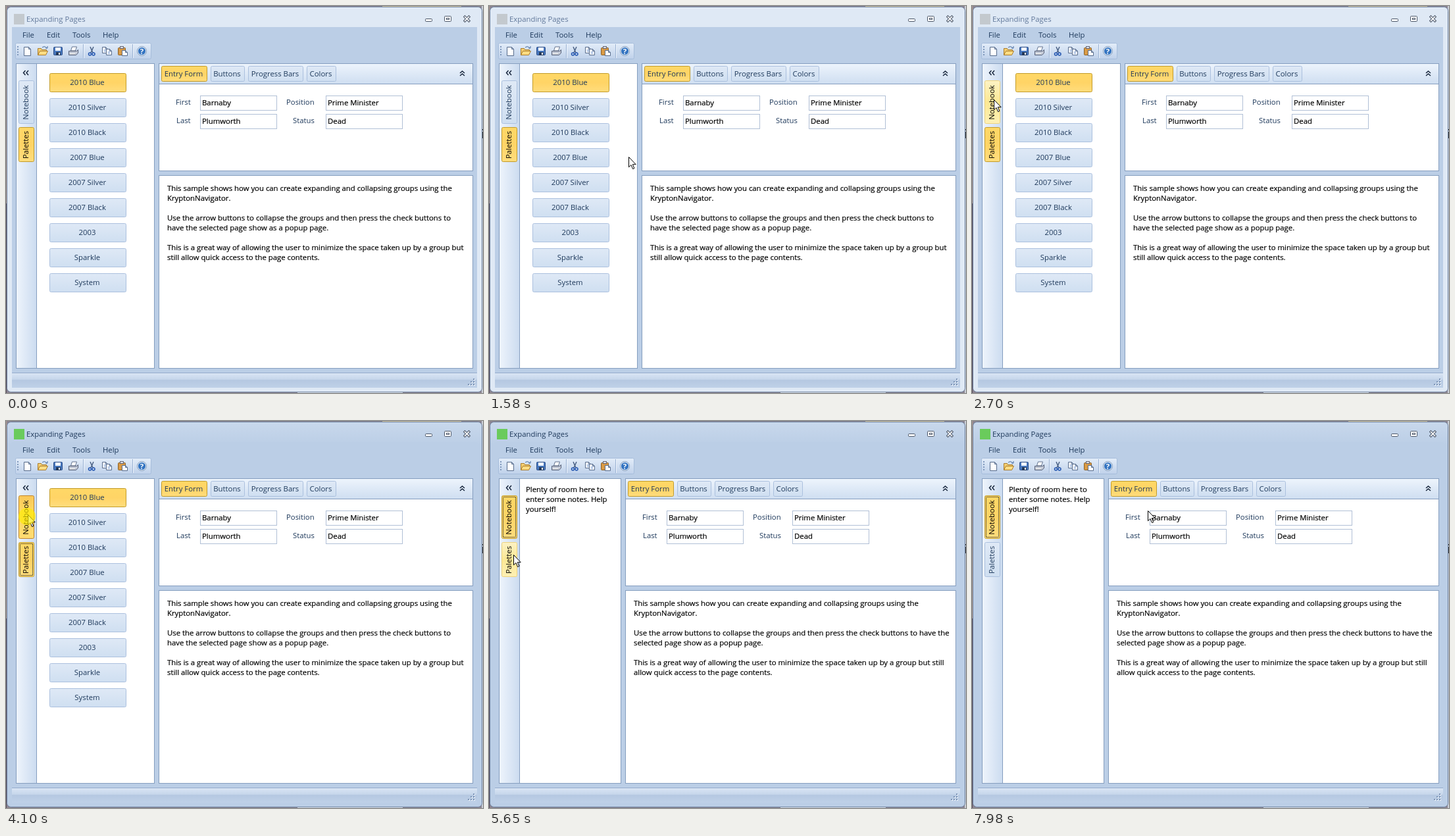
Recreate the animation shown at these times as an HTML page. Size 725 px wide and 588 px high, loop 8 s.

```html
<!DOCTYPE html>
<html lang="en">
<head>
<meta charset="utf-8">
<title>Expanding Pages</title>
<style>
  html, body { margin: 0; width: 100%; height: 100%; overflow: hidden; background: #8b8490; }
  svg { display: block; width: 725px; height: 588px; }
  text { font: 11.35px "Open Sans", "Noto Sans", sans-serif; fill: #1e395b; white-space: pre; }
  .ink { fill: #000; stroke: #000; stroke-width: .2px; }
  .mid { text-anchor: middle; }
  .panel { fill: #fff; stroke: #859ebf; }
  .field { fill: #fff; stroke: #b1c0d6; }
  .key rect { fill: url(#normal); stroke: #abc0de; }
  .key.sel rect { fill: url(#selected); stroke: #c29b29; }
  .key.hot rect { fill: url(#hover); stroke: #eed37c; }
  .key.down rect { fill: url(#pressed); stroke: #c2862b; }
  .key .focus { fill: none !important; stroke: #000 !important; stroke-dasharray: 1 1; stroke-dashoffset: .5; visibility: hidden; }
  .key.focused .focus { visibility: visible; }
  .tab.sel text, .tab.hot text, .tab.down text { fill: #000; }
  .frame { fill: #dfe9f5; }
  .logo { fill: #c3c9ce; }
  .title { fill: #61789a; }
  .active .frame { fill: url(#chrome); }
  .active .logo { fill: #6acb5c; }
  .active .title { fill: #1e395b; }
</style>
</head>
<body>
<svg id="stage" viewBox="0 0 725 588">
  <defs>
    <linearGradient id="normal" x2="0" y2="1"><stop stop-color="#dfe9f6"/><stop offset="1" stop-color="#cfdff1"/></linearGradient>
    <linearGradient id="selected" x2="0" y2="1"><stop stop-color="#ffd866"/><stop offset=".5" stop-color="#ffd466"/><stop offset="1" stop-color="#ffdd7d"/></linearGradient>
    <linearGradient id="hover" x2="0" y2="1"><stop stop-color="#fcf2c4"/><stop offset=".5" stop-color="#fce894"/><stop offset="1" stop-color="#fdf0b5"/></linearGradient>
    <linearGradient id="pressed" x2="0" y2="1"><stop stop-color="#f9c75a"/><stop offset=".3" stop-color="#ffd65f"/><stop offset="1" stop-color="#ffdc72"/></linearGradient>
    <linearGradient id="chrome" x2="0" y2="1"><stop stop-color="#c8d8ec"/><stop offset=".06" stop-color="#bbcee6"/><stop offset="1" stop-color="#bbcee6"/></linearGradient>
    <linearGradient id="strip"><stop stop-color="#eef4fc"/><stop offset="1" stop-color="#ccdcf0"/></linearGradient>
    <linearGradient id="header" x2="0" y2="1"><stop stop-color="#edf4fc"/><stop offset="1" stop-color="#cfdef1"/></linearGradient>
    <linearGradient id="bar" x2="0" y2="1"><stop stop-color="#e3edf9"/><stop offset="1" stop-color="#bfd1ea"/></linearGradient>
    <linearGradient id="status" x2="0" y2="1"><stop stop-color="#d9e5f4"/><stop offset=".42" stop-color="#c6d6eb"/><stop offset=".48" stop-color="#b5c8e1"/><stop offset="1" stop-color="#bfd1e8"/></linearGradient>
  </defs>
</svg>
<script>
const NS = 'http://www.w3.org/2000/svg';
const stage = document.getElementById('stage');

function add(parent, tag, attrs = {}, content) {
  const node = document.createElementNS(NS, tag);
  for (const name in attrs) node.setAttribute(name, attrs[name]);
  if (content) node.textContent = content;
  return parent.appendChild(node);
}
const group = (parent, attrs) => add(parent, 'g', attrs);
const rect = (parent, x, y, width, height, attrs) => add(parent, 'rect', { x, y, width, height, ...attrs });
const path = (parent, d, attrs) => add(parent, 'path', { d, fill: 'none', stroke: '#1e395b', ...attrs });
const label = (parent, x, y, content, attrs) => add(parent, 'text', { x, y, ...attrs }, content);

function key(parent, x, y, w, h, content, cls = '') {
  const node = group(parent, { class: 'key ' + cls });
  rect(node, x + .5, y + .5, w - 1, h - 1, { rx: 2 });
  label(node, x + w / 2 - 1, y + h / 2 + 3.5, content, { class: 'mid' });
  return { node, x, y, w, h };
}

function sideTab(parent, y, h, content) {
  const node = group(parent, { class: 'key tab' });
  rect(node, 19.5, y + .5, 23, h - 1, { rx: 2 });
  rect(node, 21.5, y + 2.5, 19, h - 5, { class: 'focus' });
  add(node, 'text', { transform: `translate(34 ${y + h / 2 + .5}) rotate(-90)`, class: 'mid' }, content);
  return { node, x: 19, y, w: 24, h };
}

function drawWindow() {
  rect(stage, 0, 0, 1, 300, { fill: '#a9958c' });
  rect(stage, 0, 300, 1, 288, { fill: '#574c5c' });
  rect(stage, 572, 0, 120, 1, { fill: '#d9c9a0' });
  rect(stage, 723, 0, 2, 588, { fill: '#c9ced6' });
  rect(stage, 443, 587, 160, 1, { fill: '#e4e8ee' });
  rect(stage, 1.5, 1.5, 722, 585, { rx: 6, class: 'frame', stroke: '#6d819e' });
  path(stage, 'M724.5 187v2m0 2v10', { stroke: '#333' });
  rect(stage, 9, 32, 707, 548, { fill: '#bbcee6' });
  rect(stage, 12, 12, 16, 16, { class: 'logo' });
  label(stage, 31, 24, 'Expanding Pages', { class: 'title' });

  const glyph = { stroke: '#4b5668', fill: '#fff' };
  rect(stage, 637.5, 19.5, 10, 4, { rx: 1, ...glyph });
  rect(stage, 666.5, 15.5, 10, 8, { rx: 1, ...glyph });
  rect(stage, 669.5, 18.5, 4, 2, glyph);
  const cross = 'M697.5 16.5l6 6m0-6l-6 6';
  path(stage, cross, { stroke: '#4b5668', 'stroke-width': 3.8, 'stroke-linecap': 'square' });
  path(stage, cross, { stroke: '#fff', 'stroke-width': 1.7, 'stroke-linecap': 'square' });

  [['File', 25], ['Edit', 62], ['Tools', 101], ['Help', 147]].forEach(([name, x]) => label(stage, x, 48, name));
  drawToolbar();

  rect(stage, 9, 557, 707, 1, { fill: '#94abcb' });
  rect(stage, 9, 558, 707, 22, { fill: 'url(#status)' });
  for (let row = 0; row < 3; row++)
    for (let col = 2 - row; col < 3; col++) {
      rect(stage, 703 + col * 4, 567 + row * 4, 2, 2, { fill: '#edf3fa' });
      rect(stage, 702 + col * 4, 566 + row * 4, 2, 2, { fill: '#7b93b5' });
    }
}

function drawToolbar() {
  rect(stage, 14.5, 56.5, 206, 24, { rx: 2, fill: 'url(#bar)', stroke: '#a6bddb' });
  for (let i = 0; i < 4; i++) rect(stage, 17, 61 + i * 4, 2, 2, { fill: '#7f98bc' });
  for (const x of [117.5, 192.5]) {
    path(stage, `M${x} 58v21`, { stroke: '#98b0d2' });
    path(stage, `M${x + 1} 58v21`, { stroke: '#f0f6fd' });
  }
  const sheet = (x, y, w, h) =>
    path(stage, `M${x} ${y}h${w - 3}l3 3v${h - 3}h${-w}zm${w - 3} 0v3h3`, { fill: '#fff', stroke: '#566b8c' });
  sheet(27.5, 62.5, 10, 13);

  path(stage, 'M48.5 74.5v-10h5l1 2h7v3', { fill: '#f5cf72', stroke: '#a97c2c' });
  path(stage, 'M48.5 74.5l3-6h12l-3 6z', { fill: '#ffdc82', stroke: '#a97c2c' });
  path(stage, 'M55 63q4-3 7 1m1-3v3h-3', { stroke: '#42699e' });

  rect(stage, 72.5, 62.5, 13, 12, { rx: 1, fill: '#4878bf', stroke: '#2b4c86' });
  rect(stage, 75, 63, 8, 5, { fill: '#f5f9ff' });
  rect(stage, 76, 70, 7, 5, { fill: '#243959' });
  rect(stage, 80, 71, 2, 3, { fill: '#fff' });

  path(stage, 'M98.5 68l2-6h7l-2 6z', { fill: '#fff', stroke: '#60718d' });
  path(stage, 'M95.5 68.5h12l2-2v5l-3 3h-11z', { fill: '#c3c9d6', stroke: '#555f77' });
  path(stage, 'M97 72.5h8', { stroke: '#f7f7ef' });

  path(stage, 'M128 62l4 9m1-9l-4 9', { stroke: '#42597e', 'stroke-width': 1.4 });
  for (const cx of [127.5, 133]) add(stage, 'circle', { cx, cy: 73, r: 2, fill: 'none', stroke: '#2456b0', 'stroke-width': 1.5 });

  for (const [x, y] of [[146.5, 62.5], [152.5, 65.5]]) {
    sheet(x, y, 8, 9);
    path(stage, `M${x + 2} ${y + 4.5}h4m-4 2h4`, { stroke: '#7ea1d6' });
  }

  rect(stage, 170.5, 63.5, 11, 11, { rx: 1, fill: '#d99a45', stroke: '#87602a' });
  rect(stage, 173.5, 61.5, 5, 3, { fill: '#dce0e6', stroke: '#667' });
  sheet(176.5, 67.5, 8, 8);

  add(stage, 'circle', { cx: 206.5, cy: 68.5, r: 6.3, fill: '#3474c1', stroke: '#e6effa', 'stroke-width': 1.4 });
  add(stage, 'circle', { cx: 206.5, cy: 68.5, r: 7, fill: 'none', stroke: '#59799f', 'stroke-width': .7 });
  label(stage, 206.5, 72.5, '?', { class: 'mid', style: 'fill:#fff;font-weight:700' });
}

function drawPage(split, lines) {
  const page = group(stage);
  const left = split + 7, shift = split - 225;
  rect(page, 15.5, 87.5, split - 15, 463, { class: 'panel' });
  rect(page, left + .5, 87.5, 709 - left, 163, { class: 'panel' });
  rect(page, left + .5, 257.5, 709 - left, 293, { class: 'panel' });
  rect(page, left + 1, 88, 708 - left, 30, { fill: 'url(#header)' });
  path(page, `M${left + 1} 118.5H709`, { stroke: '#859ebf' });
  path(page, 'M690 102l3.5-3 3.5 3m-7 4l3.5-3 3.5 3', { stroke: '#17263d', 'stroke-width': 1.5 });

  const body = group(page, { transform: `translate(${shift})` });
  [['Entry Form', 236, 70, 'sel'], ['Buttons', 311, 52], ['Progress Bars', 368, 84], ['Colors', 457, 45]]
    .forEach(([name, x, w, cls]) => key(body, x, 91, w, 24, name, cls));
  [['First', 258, 295, 'Barnaby', 0], ['Last', 259, 295, 'Plumworth', 28],
   ['Position', 426, 486, 'Prime Minister', 0], ['Status', 436, 486, 'Dead', 28]]
    .forEach(([name, x, boxX, value, dy]) => {
      label(body, x, 150 + dy, name);
      rect(body, boxX + .5, 136.5 + dy, 116, 22, { class: 'field' });
      label(body, boxX + 3, 151 + dy, value, { class: 'ink' });
    });
  lines.forEach((line, i) => line && label(body, 245, 281 + i * 15, line, { class: 'ink' }));
  return page;
}

drawWindow();

const intro = ['This sample shows how you can create expanding and collapsing groups using the', 'KryptonNavigator.', ''];
const palettesPage = drawPage(225, [...intro,
  'Use the arrow buttons to collapse the groups and then press the check buttons to',
  'have the selected page show as a popup page.', '',
  'This is a great way of allowing the user to minimize the space taken up by a group but',
  'still allow quick access to the page contents.']);
const notebookPage = drawPage(200, [...intro,
  'Use the arrow buttons to collapse the groups and then press the check buttons to have the',
  'selected page show as a popup page.', '',
  'This is a great way of allowing the user to minimize the space taken up by a group but still',
  'allow quick access to the page contents.']);

const buttons = ['2010 Blue', '2010 Silver', '2010 Black', '2007 Blue', '2007 Silver', '2007 Black', '2003', 'Sparkle', 'System']
  .map((name, i) => key(palettesPage, 66, 102 + i * 38, 117, 29, name));
['Plenty of room here to', 'enter some notes. Help', 'yourself!']
  .forEach((line, i) => label(notebookPage, 56, 108 + i * 15, line, { class: 'ink' }));

rect(stage, 16, 88, 30, 462, { fill: 'url(#strip)' });
path(stage, 'M46.5 88v462', { stroke: '#859ebf' });
path(stage, 'M29.5 98l-3 3.5 3 3.5m4.5-7l-3 3.5 3 3.5', { stroke: '#17263d', 'stroke-width': 1.5 });
const notebook = sideTab(stage, 113, 66, 'Notebook');
const palettes = sideTab(stage, 184, 53, 'Palettes');
const pointer = path(stage, 'M.5.5v15.3l3.5-3.3 2.6 6.1 2.3-1-2.6-5.9h4.9z', { fill: '#fff', stroke: '#000' });
// Click highlight, a translucent spot over both the tab and the pointer.
const spot = add(stage, 'circle', { cx: 32, cy: 145, r: 13, fill: '#ffec00', 'fill-opacity': .65 });

// The pointer moves in steps of 70 ms and eases out on each leg.
const STEP = 70;
const mix = (a, b, k) => a + (b - a) * k;
const easeOut = (k, power) => 1 - (1 - k) ** power;
const legs = [
  { start: 600, steps: 11, at: k => [
      mix(mix(481, 400, k), mix(400, 277, k), k),
      mix(mix(576, 335, k), mix(335, 261, k), k)] },
  { start: 1370, steps: 19, at: k => [mix(277, 33, easeOut(k, 1.8)), mix(261, 142, easeOut(k, 1.8))] },
  { start: 5300, steps: 5, at: k => [mix(33, 37, easeOut(k, 1.7)), mix(142, 203, easeOut(k, 1.7))] },
  { start: 6650, steps: 19, at: k => [mix(37, 267, easeOut(k, 1.61)), mix(203, 136, easeOut(k, 2))] },
];

function pointerAt(t) {
  const leg = legs.filter(l => t >= l.start).pop();
  if (!leg) return null;
  const step = Math.min(leg.steps, Math.floor((t - leg.start) / STEP));
  return leg.at(step / leg.steps).map(Math.round);
}

const show = (node, on) => node.setAttribute('visibility', on ? 'visible' : 'hidden');
const within = (t, from, to) => t >= from && t < to;

function render(t) {
  const tip = pointerAt(t);
  const over = b => tip && within(tip[0], b.x, b.x + b.w) && within(tip[1], b.y, b.y + b.h);
  const switched = t >= 4370, pressing = within(t, 4100, 4370);
  const look = (b, selected) => selected ? ' sel' : over(b) ? ' hot' : '';

  stage.setAttribute('class', within(t, 70, 270) || t >= 4100 ? 'active' : '');
  palettesPage.style.display = switched ? 'none' : '';
  notebookPage.style.display = switched ? '' : 'none';
  buttons.forEach((b, i) => b.node.setAttribute('class', 'key' + look(b, i === 0)));

  notebook.node.setAttribute('class', 'key tab' + (pressing ? ' down' : look(notebook, switched)) + (switched ? ' focused' : ''));
  palettes.node.setAttribute('class', 'key tab' + look(palettes, !switched) + (within(t, 70, 340) || pressing ? ' focused' : ''));
  show(spot, pressing);

  show(pointer, tip);
  if (tip) pointer.setAttribute('transform', `translate(${tip})`);
}

const origin = performance.now();
function tick() {
  render((performance.now() - origin) % 8000);
  requestAnimationFrame(tick);
}
tick();
</script>
</body>
</html>
```
